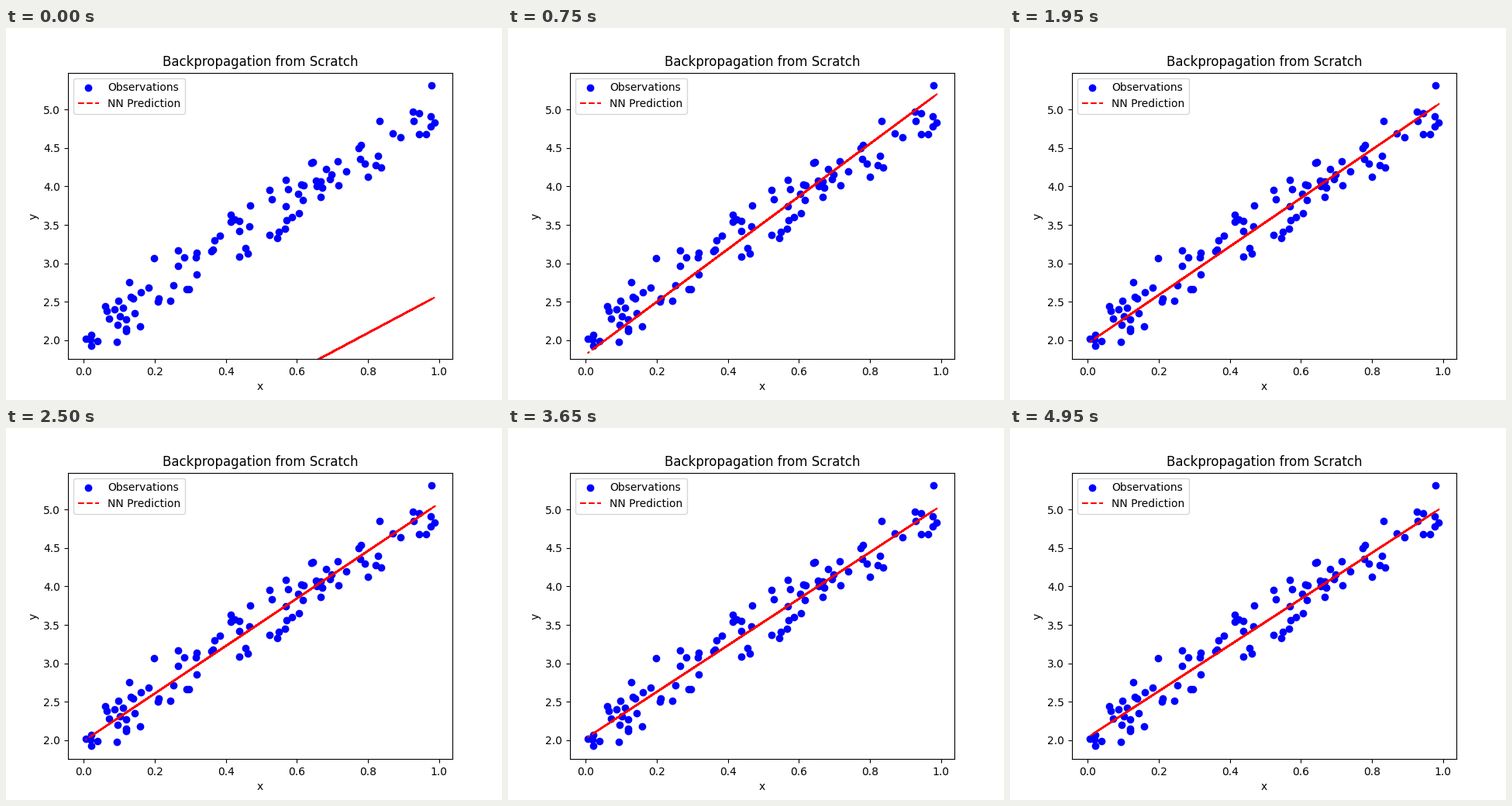
A matplotlib script for the animation above (5000 ms loop, 640 by 480 pixels).

```python
import numpy as np
import matplotlib.pyplot as plt
from matplotlib.animation import FuncAnimation

FRAMES = 100
INTERVAL = 50

# Noisy samples of y = 2 + 3x
np.random.seed(0)
x = np.random.rand(100)
y = 2 + 3 * x + 0.2 * np.random.randn(100)


def train(start, rates):
    """Return (slope, intercept) after each gradient step on the squared error."""
    params = np.array(start)
    history = []
    for _ in range(FRAMES):
        history.append(params)
        error = params[0] * x + params[1] - y
        gradient = np.array([np.mean(error * x), np.mean(error)])
        params = params - rates * gradient
    return history


history = train(start=(2.464, 0.122), rates=np.array([0.685, 0.402]))

fig, ax = plt.subplots(figsize=(6.4, 4.8), dpi=100)
ax.scatter(x, y, color="blue", label="Observations")
line, = ax.plot([], [], "r--", label="NN Prediction")
ax.set_title("Backpropagation from Scratch")
ax.set_xlabel("x")
ax.set_ylabel("y")
ax.legend(loc="upper left")


def update(frame):
    slope, intercept = history[frame]
    line.set_data(x, slope * x + intercept)
    return line,


anim = FuncAnimation(fig, update, frames=FRAMES, interval=INTERVAL,
                     repeat=True, repeat_delay=0)
plt.show()
```
